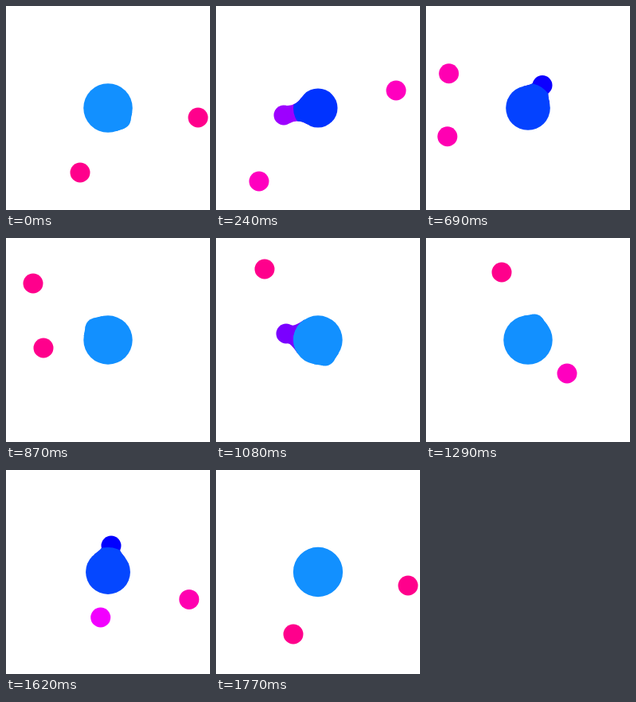
Recreate the animation shown at these times as an HTML page with a canvas. Size 256 px wide and 256 px high, loop 1800 ms.

```html
<!DOCTYPE html>
<html lang="en">
<head>
<meta charset="utf-8">
<title>Orbiting droplets</title>
<style>
  html, body { margin: 0; width: 100%; height: 100%; overflow: hidden; background: #fff; }
  canvas { display: block; width: 256px; height: 256px; }
</style>
</head>
<body>
<canvas id="stage" width="256" height="256"></canvas>
<script>
const ctx = document.getElementById('stage').getContext('2d');
const LOOP = 1800, STEP = 30;
const SMALL = 12.5, CORE_EDGE = 31, NECK_REACH = 52;

// Closed orbits around the core: [time, x, y]
const orbits = [
  [[0, -35, 81], [240, -74, 92], [480, -102, 67], [675, -102, 38], [870, -81, 10],
   [1080, -40, -8], [1290, 8, -20], [1500, 5, 37], [1640, -12, 60], [1770, -31, 78]],
  [[0, 16, 14], [240, -43, 9], [480, -84, -13], [675, -99, -41], [870, -94, -71],
   [1080, -67, -89], [1290, -33, -85], [1500, -5, -57], [1650, 6, -26]],
  [[0, 113, 12], [240, 98, -22], [480, 59, -33], [680, 20, -29], [870, -16, -15],
   [1080, 9, 20], [1290, 49, 42], [1500, 85, 46], [1650, 105, 31], [1770, 113, 17]]
];

// Looks that depend on the distance of a droplet from the core
const coreSize = [[15, 31.5], [22, 30.7], [37, 27], [44, 24.5], [62, 21.5]];
const coreHue = [[24, 208], [37, 231], [44, 228], [62, 223]];
const coreLight = [[24, 53.5], [37, 50]];
const outerHue = [[24, 327], [37, 315], [44, 315], [62, 319]];
const nearHue = [[30, 225], [37, 259], [44, 277], [57, 295], [66, 319], [75, 327]];

function ramp(stops, v) {
  if (v <= stops[0][0]) return stops[0][1];
  for (let i = 1; i < stops.length; i++) {
    const [a, p] = stops[i - 1], [b, q] = stops[i];
    if (v < b) return p + (q - p) * (v - a) / (b - a);
  }
  return stops[stops.length - 1][1];
}

function knot(path, i) {
  const n = path.length, turn = Math.floor(i / n);
  const [t, x, y] = path[i - turn * n];
  return [t + turn * LOOP, x, y];
}

// Periodic cubic through the knots
function position(path, t) {
  let i = path.length - 1;
  while (path[i][0] > t) i--;
  const [k0, k1, k2, k3] = [-1, 0, 1, 2].map(j => knot(path, i + j));
  const h = k2[0] - k1[0], s = (t - k1[0]) / h, s2 = s * s, s3 = s2 * s;
  const slope = (a, b, c, axis) => {
    const l = b[0] - a[0], r = c[0] - b[0];
    return ((b[axis] - a[axis]) / l * r + (c[axis] - b[axis]) / r * l) / (l + r);
  };
  return [1, 2].map(axis =>
    (2 * s3 - 3 * s2 + 1) * k1[axis] + (3 * s2 - 2 * s3) * k2[axis] +
    h * (s3 - 2 * s2 + s) * slope(k0, k1, k2, axis) +
    h * (s3 - s2) * slope(k1, k2, k3, axis));
}

function disc(x, y, r, color) {
  ctx.fillStyle = color;
  ctx.beginPath();
  ctx.arc(x, y, r, 0, 2 * Math.PI);
  ctx.fill();
}

// Bridge along +x between the core (radius R) and a droplet at distance d
function neckPath(R, d) {
  const a = Math.PI / 4, b = 70 * Math.PI / 180;
  let p = [R * Math.cos(a), R * Math.sin(a)];
  let q = [d - SMALL * Math.cos(b), SMALL * Math.sin(b)];
  const u = (q[0] + q[1] - p[0] - p[1]) / (Math.sin(b) + Math.cos(b));
  let c = [q[0] - u * Math.sin(b), q[1] - u * Math.cos(b)];
  if (u < 0) {
    const g = Math.acos(Math.min(1, (R - SMALL) / d));
    p = [R * Math.cos(g), R * Math.sin(g)];
    q = [d + SMALL * Math.cos(g), SMALL * Math.sin(g)];
    c = [(p[0] + q[0]) / 2, (p[1] + q[1]) / 2];
  }
  ctx.beginPath();
  ctx.moveTo(...p);
  ctx.quadraticCurveTo(...c, ...q);
  ctx.lineTo(q[0], -q[1]);
  ctx.quadraticCurveTo(c[0], -c[1], p[0], -p[1]);
  ctx.closePath();
}

function droplet(ball, R, color) {
  disc(ball.x, ball.y, SMALL, color);
  if (ball.d > NECK_REACH || ball.d < R - SMALL) return;
  ctx.save();
  ctx.rotate(Math.atan2(ball.y, ball.x));
  neckPath(R, ball.d);
  ctx.fill();
  ctx.restore();
}

function draw(t) {
  const balls = orbits.map(path => {
    const [x, y] = position(path, t);
    return { x, y, d: Math.hypot(x, y) };
  });
  const nearest = Math.min(...balls.map(b => b.d));
  const R = ramp(coreSize, nearest);
  const blue = `hsl(${ramp(coreHue, nearest)}, 100%, ${ramp(coreLight, nearest)}%)`;
  const pink = ramp(outerHue, nearest);

  ctx.setTransform(1, 0, 0, 1, 0, 0);
  ctx.fillStyle = '#fff';
  ctx.fillRect(0, 0, 256, 256);
  ctx.translate(128, 128);

  for (const ball of balls) {
    const hue = Math.min(pink, ramp(nearHue, ball.d));
    droplet(ball, R, ball.d < 30 ? blue : `hsl(${hue}, 100%, 50%)`);
  }

  // Everything close to the centre takes the core colour
  ctx.save();
  ctx.beginPath();
  ctx.arc(0, 0, CORE_EDGE, 0, 2 * Math.PI);
  ctx.clip();
  for (const ball of balls) if (ball.d < NECK_REACH) droplet(ball, R, blue);
  ctx.restore();
  disc(0, 0, R, blue);
}

const start = performance.now();
function tick() {
  const t = (performance.now() - start) % LOOP;
  draw(Math.floor(t / STEP) * STEP);
  requestAnimationFrame(tick);
}
tick();
</script>
</body>
</html>
```
